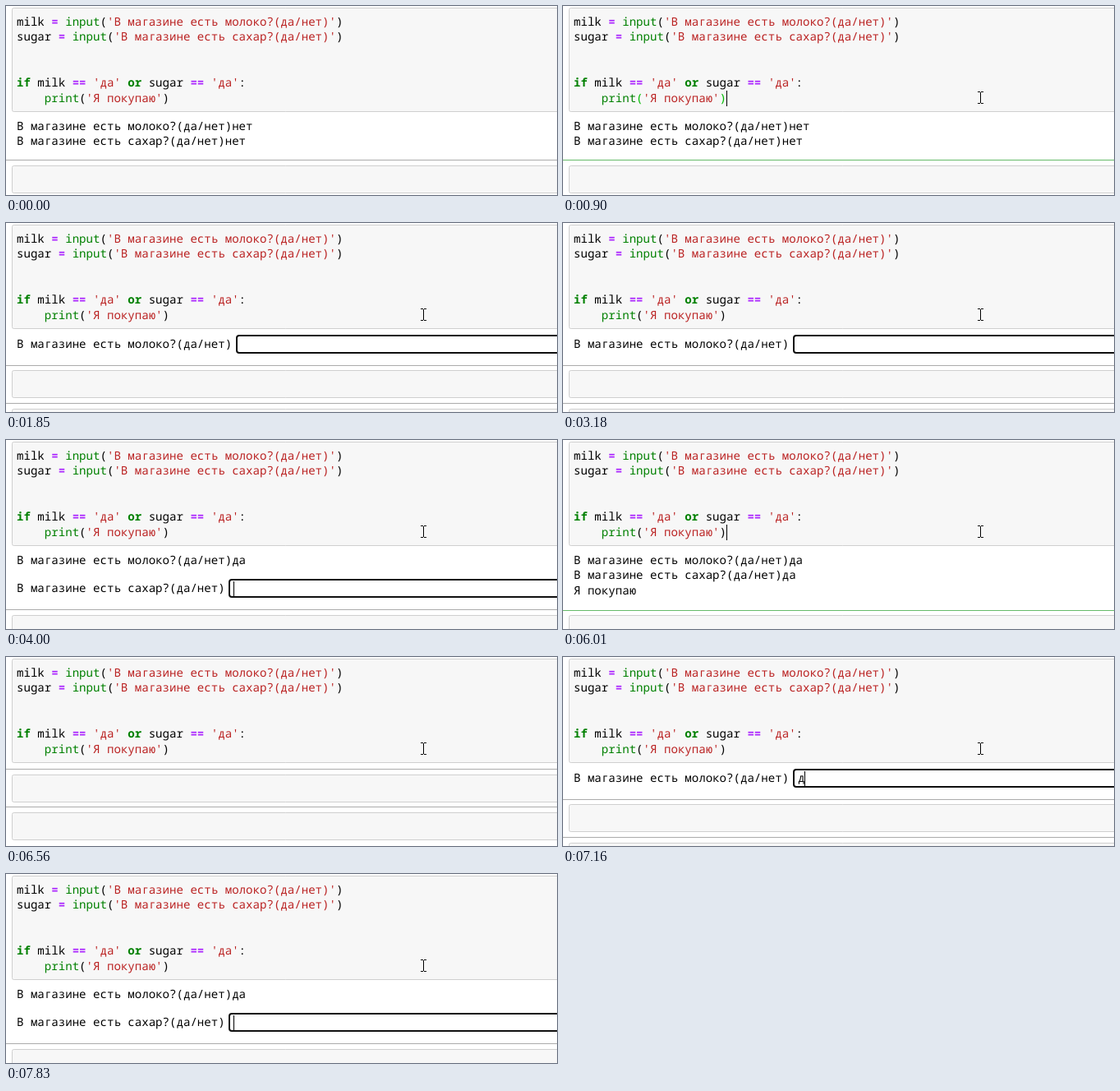
An HTML page with a canvas for the animation above (8000 ms loop, 671 by 230 pixels).

```html
<!DOCTYPE html>
<html lang="ru">
<head>
<meta charset="utf-8">
<title>Notebook</title>
<style>
html, body { margin: 0; width: 671px; height: 230px; overflow: hidden; background: #fff; }
canvas { display: block; }
</style>
</head>
<body>
<canvas id="stage" width="671" height="230"></canvas>
<script>
const ctx = document.getElementById('stage').getContext('2d');
const LOOP = 8000, W = 671, H = 230, LEFT = 13;
const FACE = '14.1px "Noto Sans Mono", "DejaVu Sans Mono", monospace';
const MILK = 'В магазине есть молоко?(да/нет)';
const SUGAR = 'В магазине есть сахар?(да/нет)';
const INK = '#000', GREEN = '#008000', RED = '#ba2121', PURPLE = '#aa22ff';
const GREY_LINE = '#ababab', EDIT_LINE = '#66bb6a', MATCH = '#00bb00';

ctx.textRendering = 'geometricPrecision';

function text(str, x, y, color = INK, bold = false) {
  ctx.font = (bold ? 'bold ' : '') + FACE;
  ctx.fillStyle = color;
  ctx.fillText(str, x, y);
  return x + ctx.measureText(str).width;
}

// Each token is [text, color, bold].
function tokens(y, list) {
  list.reduce((x, [str, color, bold]) => text(str, x, y, color, bold), LEFT);
}

function rule(y, color = GREY_LINE) {
  ctx.fillStyle = color;
  ctx.fillRect(0, y, W, 1);
}

function box(y, h) {
  ctx.beginPath();
  ctx.roundRect(7.5, y + .5, W + 20, h - 1, 2);
  ctx.fillStyle = '#f7f7f7';
  ctx.fill();
  ctx.strokeStyle = '#cfcfcf';
  ctx.lineWidth = 1;
  ctx.stroke();
}

function caret(x, y, h = 18) {
  ctx.fillStyle = INK;
  ctx.fillRect(Math.round(x), y, 1, h);
}

function codeCell(match) {
  box(2, 127);
  const bracket = match ? MATCH : INK;
  const ask = (y, name, question) => tokens(y, [
    [name + ' ', INK], ['=', PURPLE, true], [' ', INK], ['input', GREEN],
    ['(', INK], ["'" + question + "'", RED], [')', INK]
  ]);
  ask(24, 'milk', MILK);
  ask(42, 'sugar', SUGAR);
  tokens(98, [
    ['if', GREEN, true], [' milk ', INK], ['==', PURPLE, true], [' ', INK], ["'да'", RED],
    [' ', INK], ['or', GREEN, true], [' sugar ', INK], ['==', PURPLE, true], [' ', INK],
    ["'да'", RED], [':', INK]
  ]);
  tokens(117, [
    ['    ', INK], ['print', GREEN], ['(', bracket], ["'Я покупаю'", RED], [')', bracket]
  ]);
}

function prompt(question, top, typed, showCaret) {
  const left = Math.round(text(question, LEFT, top + 16) + 4.7);
  ctx.beginPath();
  ctx.roundRect(left + 1, top + 1, W, 21, 3);
  ctx.strokeStyle = '#101010';
  ctx.lineWidth = 2;
  ctx.stroke();
  const end = text(typed, left + 6, top + 16);
  if (showCaret) caret(end, top + 3);
}

function answered(milk, sugar, result, lineY, nextY, editing) {
  text(MILK + milk, LEFT, 151);
  text(SUGAR + sugar, LEFT, 169);
  if (result) text(result, LEFT, 188);
  rule(lineY, editing ? EDIT_LINE : GREY_LINE);
  box(nextY, 34);
}

function askMilk(typed, showCaret) {
  prompt(MILK, 136, typed, showCaret);
  rule(173);
  box(179, 34);
  rule(219);
  box(226, 34);
}

function askSugar(typed, showCaret) {
  text(MILK + 'да', LEFT, 151);
  prompt(SUGAR, 169, typed, showCaret);
  rule(206);
  box(213, 34);
}

function cleared() {
  rule(136);
  box(143, 34);
  rule(182);
  box(189, 34);
}

const refused = edit => answered('нет', 'нет', '', 187, 194, edit);
const bought = edit => answered('да', 'да', 'Я покупаю', 207, 213, edit);

// [start, view, ...arguments]
const timeline = [
  [0, refused, false], [760, refused, true],
  [1300, askMilk, '', true], [1850, askMilk, '', false], [2380, askMilk, '', true],
  [2520, askMilk, 'l', true], [2660, askMilk, 'lf', true],
  [3050, askMilk, 'l', true], [3180, askMilk, '', false],
  [3600, askMilk, 'д', true], [3730, askMilk, 'да', true],
  [4000, askSugar, '', true], [4550, askSugar, '', false],
  [4810, askSugar, 'д', true], [4880, askSugar, 'да', true],
  [5020, bought, false], [6010, bought, true],
  [6560, cleared],
  [6630, askMilk, '', true], [7090, askMilk, '', false],
  [7160, askMilk, 'д', true], [7230, askMilk, 'да', true], [7760, askMilk, 'да', false],
  [7830, askSugar, '', true]
];

function pointer(t) {
  if (t < 160) return;
  const step = Math.min(6, Math.floor((t - 160) / 66.6));
  const ease = 1 - (1 - step / 6) ** 2;
  const settled = t >= 900;
  const x = settled ? 508 : Math.round(584 - 71 * ease);
  const y = settled ? 111 : Math.round(219 - 106 * ease);
  ctx.fillStyle = INK;
  ctx.fillRect(x, y - 6, 1, 13);
  for (const end of [y - 7, y + 7]) {
    ctx.fillRect(x - 3, end, 3, 1);
    ctx.fillRect(x + 1, end, 3, 1);
  }
}

function draw(t) {
  ctx.fillStyle = '#fff';
  ctx.fillRect(0, 0, W, H);
  const [, view, ...args] = timeline.findLast(entry => entry[0] <= t);
  const editing = (view === refused || view === bought) && args[0];
  codeCell(editing && (t < 1300 ? t >= 900 : t >= 6140));
  view(...args);
  if (editing) caret(199, 103, 19);
  pointer(t);
}

const start = performance.now();
function frame() {
  draw((performance.now() - start) % LOOP);
  requestAnimationFrame(frame);
}
frame();
</script>
</body>
</html>
```
